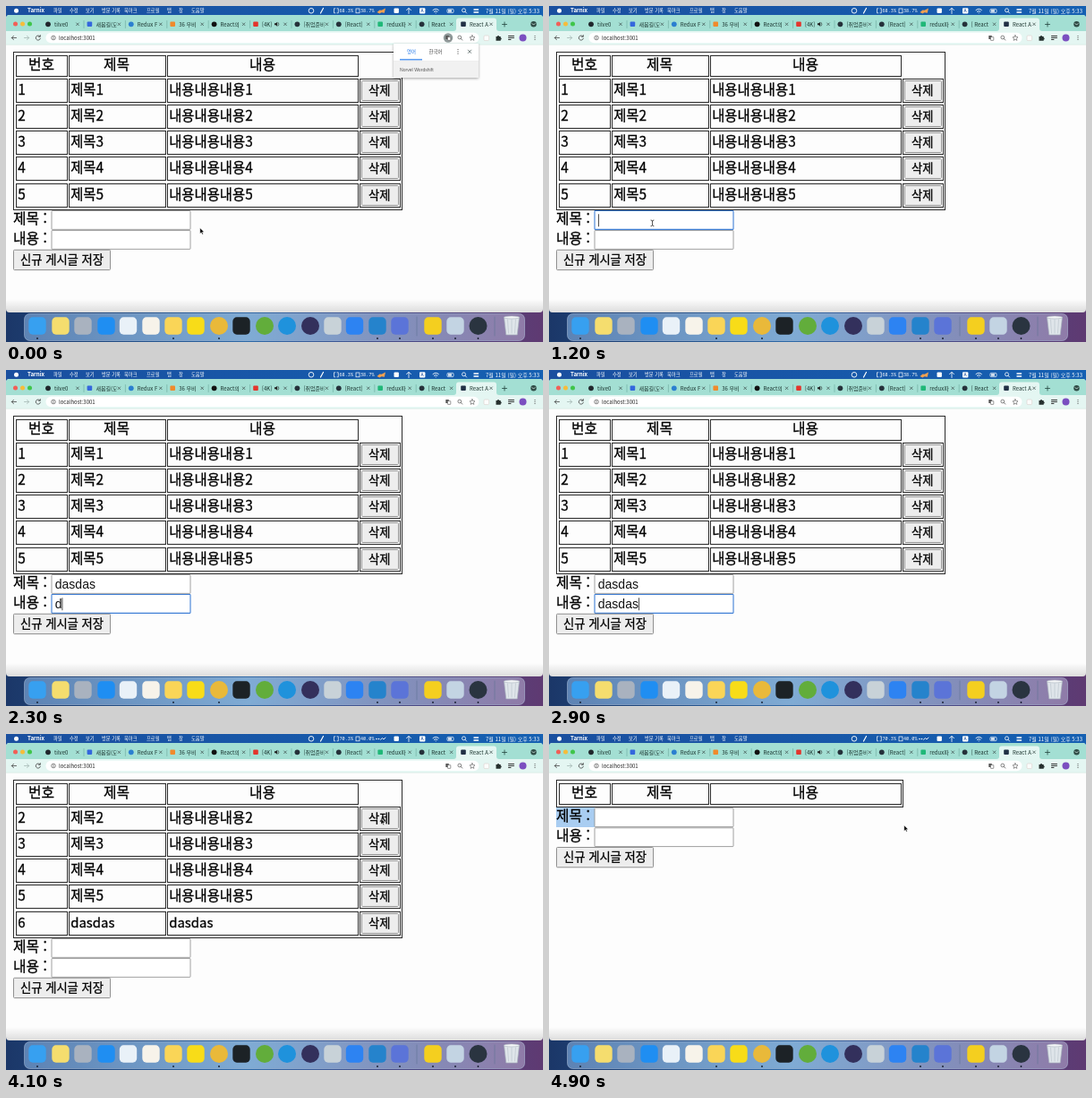
Write an HTML page that moves like this. It is 600 px wide and 375 px high and loops after 5000 ms.

```html
<!DOCTYPE html>
<html lang="ko">
<head>
<meta charset="utf-8">
<title>게시글</title>
<style>
  html, body { margin: 0; width: 100%; height: 100%; overflow: hidden; background: #1d3a70; }
  svg { display: block; }
  text { font-family: "Noto Sans CJK KR", "Noto Sans CJK", "Noto Sans", sans-serif; white-space: pre; }
  .arial { font-family: "Liberation Sans", Arial, sans-serif; }
  .mono { font-family: "Noto Sans Mono", monospace; }
  .board { stroke: #000; stroke-width: .28px; }
</style>
</head>
<body>
<svg id="stage" width="600" height="375" viewBox="0 0 600 375">
  <defs>
    <linearGradient id="bar"><stop offset="0" stop-color="#1a4f9f"/><stop offset="1" stop-color="#1560b2"/></linearGradient>
    <linearGradient id="desk"><stop offset="0" stop-color="#1b3768"/><stop offset=".45" stop-color="#2f6aa8"/><stop offset=".75" stop-color="#4a4a86"/><stop offset="1" stop-color="#5f3a72"/></linearGradient>
    <linearGradient id="dock"><stop offset="0" stop-color="#5d83b4"/><stop offset=".45" stop-color="#7fabd4"/><stop offset=".75" stop-color="#8290bc"/><stop offset="1" stop-color="#8f7ba8"/></linearGradient>
    <linearGradient id="shade" x2="0" y2="1"><stop offset="0" stop-color="#000" stop-opacity="0"/><stop offset="1" stop-color="#000" stop-opacity=".13"/></linearGradient>
    <filter id="soft" x="-10%" y="-10%" width="120%" height="140%"><feDropShadow dx="0" dy="1" stdDeviation="1.6" flood-opacity=".35"/></filter>
  </defs>
</svg>
<script>
const stage = document.getElementById('stage');

function add(tag, attrs, parent = stage) {
  const e = document.createElementNS('http://www.w3.org/2000/svg', tag);
  for (const k in attrs) e.setAttribute(k, attrs[k]);
  parent.appendChild(e);
  return e;
}
const group = parent => add('g', {}, parent);
const rect = (x, y, width, height, fill, parent, more) => add('rect', { x, y, width, height, fill, ...more }, parent);
const dot = (cx, cy, r, fill, parent, more) => add('circle', { cx, cy, r, fill, ...more }, parent);
const line = (d, stroke, parent, width = 0.8) =>
  add('path', { d, stroke, fill: 'none', 'stroke-width': width, 'stroke-linecap': 'round', 'stroke-linejoin': 'round' }, parent);
function text(str, x, y, size, parent, more) {
  const e = add('text', { x, y, 'font-size': size, fill: '#111', ...more }, parent);
  e.textContent = str;
  return e;
}
const mid = { 'text-anchor': 'middle' };
const cross = (x, y, r, parent) => line(`M${x - r} ${y - r}l${2 * r} ${2 * r}m0 ${-2 * r}l${-2 * r} ${2 * r}`, '#3a4a48', parent, 0.7);
const show = (e, on) => e.setAttribute('display', on ? 'inline' : 'none');
const move = (e, x, y) => e.setAttribute('transform', `translate(${x} ${y})`);

// Desktop and window
rect(0, 0, 600, 375, 'url(#desk)');
rect(0, 0, 600, 14, 'url(#bar)');
rect(0, 10, 600, 332, '#fdfdfd', stage, { rx: 4 });
rect(0, 327, 600, 15, 'url(#shade)', stage, { rx: 4 });
add('path', { d: 'M0 29V14a4 4 0 0 1 4-4H596a4 4 0 0 1 4 4V29z', fill: '#a3dfd3' });
rect(0, 28, 600, 15, '#e4f6f2');
line('M0 43.2H600', '#c3dcd6', stage, 0.5);

// Menu bar
const white = { fill: '#fff' };
dot(11.5, 5.2, 2.5, '#fff');
text('Tarnix', 24, 7.4, 6.2, stage, { fill: '#fff', 'font-weight': 700 });
[['파일', 53], ['수정', 71], ['보기', 89], ['방문 기록', 107], ['북마크', 132], ['프로필', 157], ['탭', 180], ['창', 193], ['도움말', 207]]
  .forEach(([s, x]) => text(s, x, 7.3, 5.3, stage, white));
dot(341, 5.3, 2.8, 'none', stage, { stroke: '#fff', 'stroke-width': 0.9 });
line('M351.5 8l3-5.5', '#fff', stage, 1.2);
line('M367.8 2.8h-1.3v5h1.3M370 2.8h1.3v5h-1.3', '#fff', stage, 0.7);
rect(391, 3, 4, 4.8, 'none', stage, { stroke: '#fff', 'stroke-width': 0.7 });
const cpu = text('', 372.5, 7.4, 5.2, stage, { ...white, class: 'mono' });
const mem = text('', 396, 7.4, 5.2, stage, { ...white, class: 'mono' });
const flyer = add('path', { d: 'M414.5 7l3-2.6 2 .4 4.5-2.2-1.2 5.2-3.2-.6-2.2 1.4z', fill: '#f0a050' });
const trail = group();
[414, 416.5].forEach(x => dot(x, 5.5, 0.8, '#fff', trail));
line('M418.5 6.2l2-1.6 1.5 1.4 2-2', '#fff', trail, 0.9);
rect(433.5, 2.6, 5.4, 5.4, '#fff', stage, { rx: 1 });
line('M450 2.5v6M447.5 4.5l2.5-2 2.5 2', '#fff');
rect(462, 2.3, 6.4, 6.2, '#fff', stage, { rx: 1 });
text('A', 465.2, 7.3, 5.2, stage, { ...mid, fill: '#164a9c' });
line('M477 4.6q3.2-2.8 6.4 0M478.4 6.2q1.8-1.5 3.6 0M480.2 7.8v.1', '#fff', stage, 0.9);
rect(493, 3.4, 7, 4.2, 'none', stage, { rx: 1, stroke: '#fff', 'stroke-width': 0.7 });
rect(494, 4.4, 4, 2.2, '#fff');
dot(511.5, 4.8, 2, 'none', stage, { stroke: '#fff', 'stroke-width': 0.8 });
line('M513 6.3l1.6 1.7', '#fff');
line('M523 4h4.6M523 7h4.6', '#fff', stage, 1.4);
text('7월 11일 (일) 오후 5:33', 536, 7.5, 6, stage, white);

// Tab strip
['#f25f57', '#f6bd3b', '#3fc54a'].forEach((c, i) => dot(10.5 + i * 8, 20, 2.5, c));
add('path', { d: 'M500 28q3 0 3-3v-8.500q0-3 3-3h39q3 0 3 3v8.500q0 3 3 3z', fill: '#e4f6f2' });
const tabs = [
  ['tilve0', '#20262c'], ['새봄길(모', '#3467dd', 1], ['Redux F', '#2b7fd0'], ['36 우비', '#f08a2c', 1],
  ['React의', '#111'], ['[4K]', '#e3352d', 1], ['[취업준비', '#25313a'], ['[React]', '#25313a'],
  ['redux파', '#20b878', 1], ['[ React', '#25313a'], ['React A', '#213045', 1]
];
tabs.forEach(([name, color, square], i) => {
  const x = 47 + i * 46.4;
  if (square) rect(x - 2.8, 17.5, 5.6, 5.6, color, stage, { rx: 1 });
  else dot(x, 20.3, 2.9, color);
  const box = add('svg', { x: x + 7, y: 13, width: 23, height: 14 });
  text(name, 0, 9.5, 6, box, { fill: '#17302b' });
  cross(x + (i === 10 ? 31 : 33), 20.3, 1.4);
  if (i < 9) line(`M${x + 40} 16.500v8`, '#5f9c90', stage, 0.5);
});
add('path', { d: 'M300 19.300h1.500l1.700-1.600v5.200l-1.700-1.600h-1.500z', fill: '#222' });
line('M304.300 18.600q1.400 1.700 0 3.400', '#222', stage, 0.6);
line('M557 18v5M554.500 20.500h5', '#24463f');
dot(589.5, 20.3, 3.2, '#2f4b46');
line('M588 19.600l1.500 1.500 1.500-1.500', '#e4f6f2');

// Toolbar
line('M11.500 35.500h-5m2-2.200l-2.200 2.200 2.200 2.200', '#444');
line('M20.500 35.500h5m-2-2.200l2.200 2.200-2.200 2.200', '#a5b8b4');
line('M38 34a2.600 2.600 0 1 0 .4 2.300M38.300 32.500v1.800h-1.800', '#444');
rect(44.5, 29.8, 484, 11.4, '#fff', stage, { rx: 5.7 });
dot(53, 35.5, 2.3, 'none', stage, { stroke: '#555', 'stroke-width': 0.7 });
line('M53 35.300v1.200M53 34.200v.1', '#555', stage, 0.7);
text('localhost:3001', 59, 37.7, 6, stage, { fill: '#222' });
const halo = dot(494, 35.5, 5.2, '#8f9a9a');
rect(491.3, 33, 3.6, 4, '#555', stage, { rx: 0.5 });
rect(493.4, 34.6, 3.4, 3.8, '#fff', stage, { rx: 0.5, stroke: '#555', 'stroke-width': 0.6 });
dot(506.8, 35, 1.9, 'none', stage, { stroke: '#555', 'stroke-width': 0.7 });
line('M508.300 36.500l1.500 1.600', '#555');
line('M521 32.600l.9 2 2.100.2-1.600 1.500.5 2.100-1.900-1.100-1.900 1.100.5-2.100-1.600-1.500 2.100-.2z', '#555', stage, 0.6);
rect(534, 33, 5.6, 5.6, '#fbfdfc', stage, { rx: 1, stroke: '#dccfcb', 'stroke-width': 0.6 });
add('path', { d: 'M547.500 34h1.500a1 1 0 0 1 2 0h1.700v1.600a1 1 0 0 1 0 2v1.200h-5.200z', fill: '#26302e' });
line('M561.500 33.500h6M561.500 35.500h6M561.500 37.500h2.500', '#333', stage, 1);
dot(577.5, 35.5, 4, '#7b4fc0');
[33.5, 35.5, 37.5].forEach(y => dot(591, y, 0.6, '#444'));

// Board table
const cols = [[11.5, 57], [70.5, 108], [180.5, 213], [395.5, 45]];
const ink = '#2a2a2a';
const pitch = 29.15;
const cell = (c, y, h, parent) => rect(cols[c][0], y, cols[c][1], h, 'none', parent, { stroke: ink, 'stroke-width': 1 });
const grayButton = (x, y, w, h, parent) => rect(x, y, w, h, '#ededed', parent, { rx: 1, stroke: '#858585', 'stroke-width': 0.9 });
const boardText = (s, x, y, size, parent, more) => text(s, x, y, size, parent, { fill: '#000', class: 'board', ...more });
const frame = rect(8.5, 51.5, 434, 0, 'none', stage, { stroke: ink, 'stroke-width': 1 });
['번호', '제목', '내용'].forEach((s, c) => {
  cell(c, 55.5, 23);
  boardText(s, [39.5, 123.5, 286.5][c], 71.3, 15.8, stage, mid);
});
const rows = [1, 2, 3, 4, 5, 6].map(n => {
  const g = group();
  const words = n < 6 ? [n, '제목' + n, '내용내용내용' + n] : [6, 'dasdas', 'dasdas'];
  words.forEach((s, c) => boardText(s, cols[c][0] + 1.7, 18.3, n < 6 ? 15.4 : 14.9, g));
  cols.forEach((_, c) => cell(c, 0.5, 26, g));
  grayButton(397.5, 2.5, 41, 22, g);
  boardText('삭제', 417.2, 17.8, 13.3, g, mid);
  return g;
});

// Entry form, placed below the table
const form = group();
const picked = rect(8, 0, 43, 22, '#a9cdf1', form);
function field(label, y) {
  boardText(label + ' :', 8, y + 15.3, 15.8, form);
  const box = rect(51, y + 0.8, 155, 20.8, '#fff', form, { rx: 0.6 });
  const value = text('', 54.8, y + 16, 14, form, { class: 'arial' });
  const caret = rect(0, y + 4.5, 0.8, 14, '#222', form);
  return (str, focus, blink) => {
    value.textContent = str;
    box.setAttribute('stroke', focus ? '#3f7fd6' : '#8a8a8a');
    box.setAttribute('stroke-width', focus ? 1.1 : 0.8);
    caret.setAttribute('x', 55 + str.length * 7.52);
    show(caret, focus && blink);
  };
}
const setTitle = field('제목', 0);
const setBody = field('내용', 22);
grayButton(8.5, 44.5, 108, 22.3, form);
boardText('신규 게시글 저장', 62.5, 60.3, 13.3, form, mid);
const hint = group(form);
rect(50.8, 22.5, 155.6, 21.5, '#fff', hint, { rx: 1, filter: 'url(#soft)' });
text('dasdas', 55.2, 35.3, 5.6, hint, { class: 'arial' });

// Translation bubble
const bubble = group();
rect(433, 42, 95, 38, '#fff', bubble, { rx: 1, filter: 'url(#soft)' });
rect(433, 62, 95, 18, '#f1f1f1', bubble);
text('영어', 453, 52.8, 5.4, bubble, { ...mid, fill: '#1a73e8' });
text('한국어', 480, 52.8, 5.4, bubble, { ...mid, fill: '#444' });
rect(440, 59.3, 25, 1.1, '#1a73e8', bubble);
line('M433 61.500h95', '#ddd', bubble, 0.5);
[48.5, 50.8, 53.1].forEach(y => dot(505, y, 0.6, '#444', bubble));
cross(518, 50.8, 1.7, bubble);
text('Norvel Wordshift', 440, 73, 5.1, bubble, { class: 'arial', fill: '#555' });

// Dock
rect(20.5, 343.5, 559, 30, 'url(#dock)', stage, { rx: 6, stroke: '#b4c6de', 'stroke-width': 0.5 });
const round = 1;
[
  [35, '#37a0f0'], [61, '#f5dd6e'], [86, '#a9b2bf'], [112, '#1f8ef2'], [136.5, '#e9f1f8'], [162, '#f7f3ea'],
  [187, '#fad557'], [212, '#f8dc18'], [238, '#e9b93a', round], [263, '#1c2226'], [289, '#62ad3b', round],
  [314, '#1f92dc', round], [340, '#33305c', round], [365, '#c8d2d8'], [389.5, '#2d83f2'], [415, '#2583cc'],
  [440, '#5b74d8'], [477, '#f4cf1f'], [502, '#c3d4e3'], [527.5, '#2a3440', round]
].forEach(([x, color, circle]) => {
  if (circle) dot(x, 357, 10, color);
  else rect(x - 9.7, 347.3, 19.4, 19.4, color, stage, { rx: 4.6 });
});
[459, 546].forEach(x => line(`M${x} 347v21`, '#5f7296', stage, 0.6));
add('path', { d: 'M556.500 347.500h17l-2.300 19.500h-12.400z', fill: '#dfe5ea', stroke: '#aab4be', 'stroke-width': 0.7 });
line('M560.500 350l1 15M565 350v15M569.500 350l-1 15', '#b7c1ca', stage, 0.6);
add('ellipse', { cx: 565, cy: 347.5, rx: 8.7, ry: 1.5, fill: '#f5f7f8', stroke: '#aab4be', 'stroke-width': 0.6 });
[35, 187, 238, 415, 440, 477, 502, 527.5].forEach(x => dot(x, 371, 0.9, '#101828'));

// Pointer
const arrow = add('path', { d: 'M0 0v6.200l1.500-1.300 1 2.200 1-.4-1-2.200h2z', fill: '#000', stroke: '#fff', 'stroke-width': 0.4 });
const beam = line('M-1.500-3.300q1.500 0 1.500 1v4.600q0 1-1.500 1M1.500-3.300q-1.500 0-1.500 1M1.500 3.300q-1.500 0-1.500-1', '#111', stage, 0.7);

const path = [
  [0, 216.8, 247.8], [250, 216.8, 247.8], [700, 110, 242], [1100, 110, 242], [1500, 145, 244], [3250, 145, 244],
  [3500, 337.5, 172.7], [3800, 419, 94.5], [4700, 419, 94.5], [4900, 396.8, 102]
];
function pointerAt(t) {
  const i = path.findIndex(p => p[0] > t);
  if (i < 0) return path[path.length - 1].slice(1);
  const [a, b] = [path[i - 1], path[i]];
  const k = (t - a[0]) / (b[0] - a[0]), e = k * k * (3 - 2 * k);
  return [a[1] + (b[1] - a[1]) * e, a[2] + (b[2] - a[2]) * e];
}

const word = 'dasdas';
const titleKeys = [1400, 1500, 1600, 1800, 1900, 2000];
const bodyKeys = [2300, 2400, 2500, 2600, 2700, 2800];
const deletes = [4000, 4200, 4300, 4400, 4500, 4600];
const open = 1000, tab = 2200, save = 3200, step = 100, loop = 5000;
const past = (times, t) => times.filter(x => x <= t).length;

function draw(t) {
  const gone = past(deletes, t);
  const total = t >= save ? 6 : 5;
  const count = total - gone;
  const bottom = 82 + count * pitch;

  rows.forEach((g, i) => {
    show(g, i >= gone && i < total);
    move(g, 0, Math.round(81 + (i - gone) * pitch));
  });
  frame.setAttribute('width', count ? 434 : 387);
  frame.setAttribute('height', Math.round(bottom) - 52);
  move(form, 0, bottom);

  const typed = past(titleKeys, t), saved = t >= save;
  const onTitle = t >= open && t < tab;
  const blink = t < 3400 || t >= 3800;
  setTitle(saved ? '' : word.slice(0, typed), onTitle, true);
  setBody(saved ? '' : word.slice(0, past(bodyKeys, t)), t >= tab && !gone, blink);
  show(hint, onTitle && typed > 0);
  show(picked, t >= 4700);
  show(bubble, t < open);
  show(halo, t < open);

  const late = t >= 4000;
  cpu.textContent = late ? '70.3%' : '68.3%';
  mem.textContent = late ? '40.0%' : '38.7%';
  show(flyer, !late);
  show(trail, late);

  const [x, y] = pointerAt(t);
  const inField = t < save && x < 206;
  const hidden = t > 1700 && t < 3300;
  show(arrow, !hidden && !inField);
  show(beam, !hidden && inField);
  move(arrow, x, y);
  move(beam, x, y);
}

const start = performance.now();
function tick() {
  const t = (performance.now() - start) % loop;
  draw(Math.floor(t / step) * step);
  requestAnimationFrame(tick);
}
draw(0);
requestAnimationFrame(tick);
</script>
</body>
</html>
```
